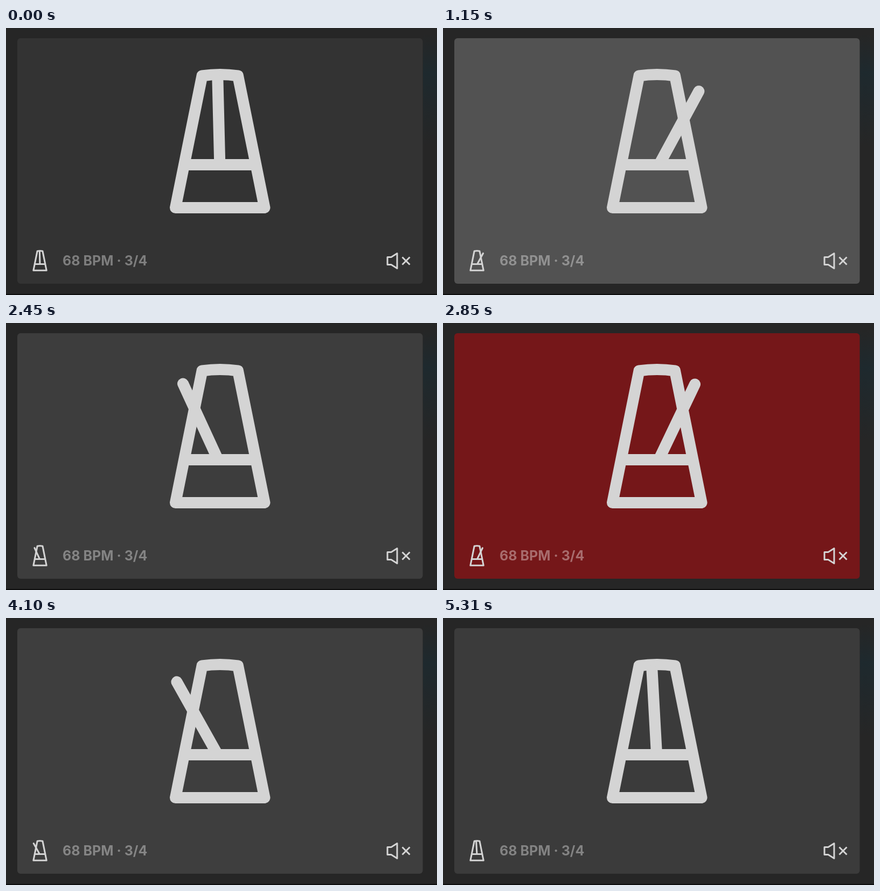
Recreate the animation shown at these times as an HTML page. Size 800 by 497 pixels, loop 5.36 s.

```html
<!DOCTYPE html>
<html lang="en">
<head>
<meta charset="utf-8">
<title>Metronome</title>
<style>
  html, body { margin: 0; height: 100%; overflow: hidden; background: #262626; }
  svg { display: block; width: 100%; height: 100%; }
  text { font: 700 25px Inter, Arial, sans-serif; fill: #fff; fill-opacity: .37; }
  .icon { fill: none; stroke: #d4d4d4; stroke-linejoin: round; }
</style>
</head>
<body>
<svg viewBox="0 0 800 497">
  <defs>
    <linearGradient id="glow" x2="0" y2="1">
      <stop offset="0" stop-color="#1c2a30" stop-opacity="0"/>
      <stop offset=".35" stop-color="#1c2a30" stop-opacity=".8"/>
      <stop offset="1" stop-color="#1c2a30" stop-opacity="0"/>
    </linearGradient>
  </defs>
  <rect width="800" height="497" fill="#262626"/>
  <rect x="774" y="10" width="26" height="210" fill="url(#glow)"/>
  <rect y="495" width="800" height="2" fill="#0e0e0e"/>
  <rect id="panel" x="21" y="19" width="752.5" height="457" rx="6"/>

  <g id="metronome" class="icon" stroke-width="21">
    <path d="M314.5 334.5L364 89Q397.2 84 430.5 89L480 334.5ZM332 254.5H462"/>
    <path id="arm" d="M397 253V98" stroke-linecap="round"/>
  </g>
  <use href="#metronome" transform="translate(4.64 402.1) scale(.147)"/>

  <text x="105" y="442">68 BPM · 3/4</text>

  <g class="icon" stroke-width="3">
    <path d="M708 426.5H715L726 419.5V447.5L715 440.5H708Z"/>
    <path d="M735.5 426.5L749.5 440.5M749.5 426.5L735.5 440.5"/>
  </g>
</svg>
<script>
  const LOOP = 5360, STEP = 50, BEAT = 883.5;
  const SWING_START = -7, FLASH_START = 22;
  const BASE = [51, 51, 51];
  // Each flash: peak colour and [ms after the beat, remaining strength]
  const ACCENT = { peak: [150, 10, 12], fade: [[0, 1], [178, .67], [328, .28], [480, .05], [884, 0]] };
  const NORMAL = { peak: [85, 85, 85], fade: [[0, 1], [245, .91], [544, .32], [884, .24]] };

  const panel = document.getElementById('panel');
  const arm = document.getElementById('arm');

  function lerpPoints(points, x) {
    const i = Math.max(1, points.findIndex(p => p[0] > x));
    const [x0, y0] = points[i - 1], [x1, y1] = points[i];
    return y0 + (y1 - y0) * (x - x0) / (x1 - x0);
  }

  // Cubic ease-in-out between the two extremes, crossing the middle on each beat
  function armAngle(t) {
    const phase = (t - SWING_START) / BEAT + .5;
    const k = Math.floor(phase), p = phase - k;
    const eased = p < .5 ? 4 * p ** 3 : 1 - 4 * (1 - p) ** 3;
    return (k % 2 ? 1 : -1) * 30 * (2 * eased - 1);
  }

  function panelColor(t) {
    const k = Math.floor((t - FLASH_START) / BEAT);
    if (k < 0) return BASE;
    const flash = k % 3 ? NORMAL : ACCENT;
    const level = lerpPoints(flash.fade, t - FLASH_START - k * BEAT);
    return BASE.map((c, i) => Math.round(c + (flash.peak[i] - c) * level));
  }

  function draw() {
    const now = performance.now() % LOOP;
    const t = now >= 5310 ? 5310 : Math.floor(now / STEP) * STEP;
    arm.setAttribute('transform', `rotate(${armAngle(t)} 397 262)`);
    panel.setAttribute('fill', `rgb(${panelColor(t)})`);
    requestAnimationFrame(draw);
  }
  draw();
</script>
</body>
</html>
```
